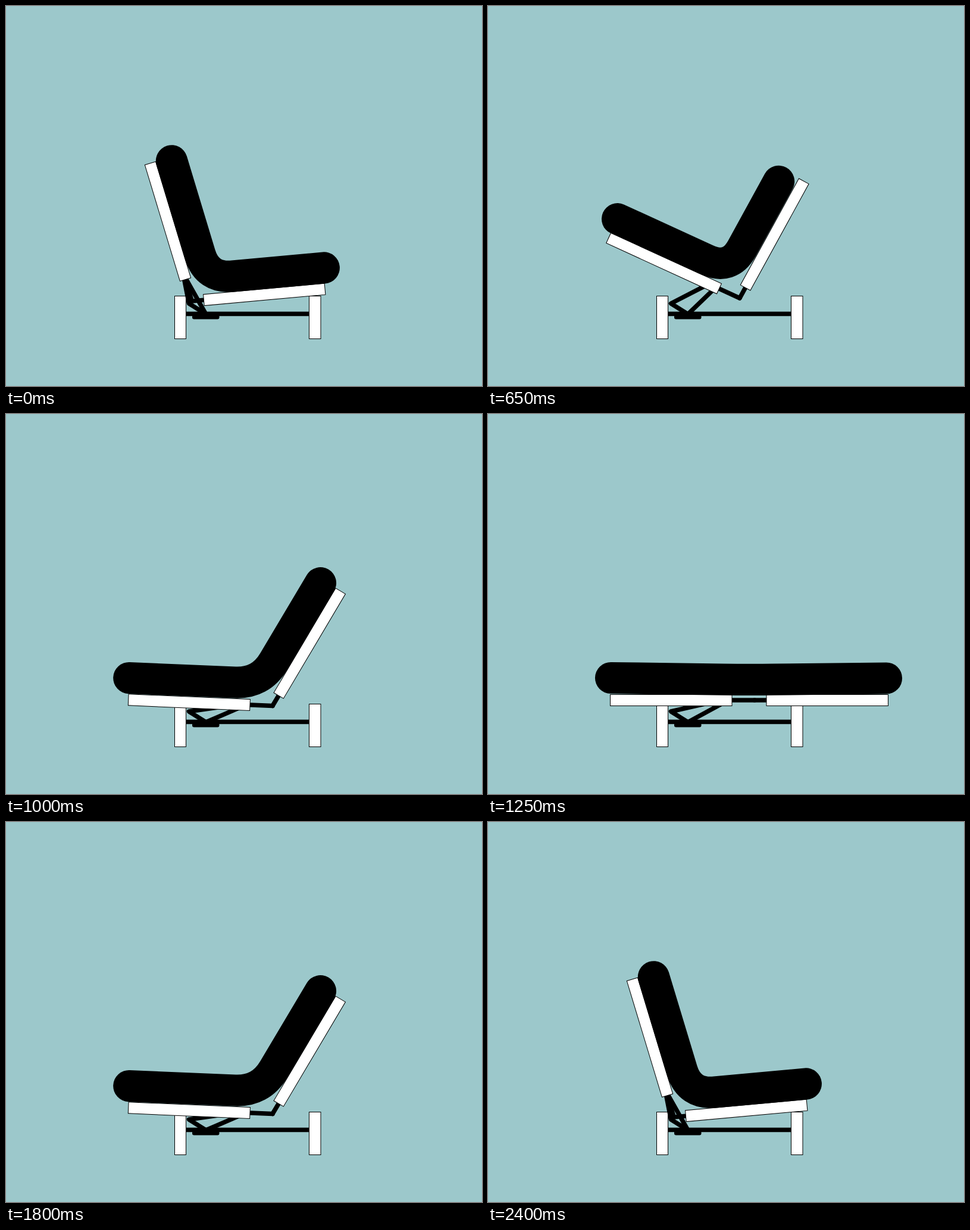
An HTML page for the animation above (2800 ms loop, 800 by 640 pixels).

```html
<!DOCTYPE html>
<html lang="en">
<head>
<meta charset="utf-8">
<title>Folding sofa bed</title>
<style>
  html, body { margin: 0; width: 100%; height: 100%; overflow: hidden; background: #9cc8cb; }
  svg { display: block; width: 800px; height: 640px; }
  .wood { fill: #fff; stroke: #000; stroke-width: 1; }
  .steel { fill: none; stroke: #000; stroke-width: 7.5; stroke-linecap: round; stroke-linejoin: round; }
  .cushion { fill: none; stroke: #000; stroke-width: 53.2; stroke-linecap: round; stroke-linejoin: round; }
</style>
</head>
<body>
<svg viewBox="0 0 800 640">
  <path class="steel" d="M303 518.5H509"/>
  <rect x="313" y="515" width="45.5" height="12.5" rx="3"/>
  <rect class="wood" x="283.5" y="488.5" width="19" height="72"/>
  <rect class="wood" x="509.5" y="488.5" width="19.5" height="72"/>
  <path id="links" class="steel"/>
  <g id="left">
    <path class="steel" d="M0 0H-60"/>
    <rect class="wood" x="-242.5" y="-9.5" width="204.5" height="19"/>
  </g>
  <g id="right">
    <path class="steel" d="M0 0H40"/>
    <rect class="wood" x="20" y="-9.5" width="204.5" height="19"/>
  </g>
  <path id="cushion" class="cushion"/>
</svg>
<script>
const STEP = 50, LOOP = 2800, LAST = 17;
const UNFOLD = 400, FOLD = 1550;

// step, hinge x, y, left tilt, right tilt, cushion ends (along, above each panel), cushion corner from hinge
const poses = [
  [0, 312.5, 497, 73.2, 5.2, 236, 35.7, 226, 35.7, 25.8, -38],
  [5, 423, 492, 24.7, 61.3, 242.4, 35.3, 204, 36.9, -16.6, -46.6],
  [7, 442, 486.5, 12.5, 80.5, 241, 35.5, 224, 51.7, -30.8, -43.5],
  [8, 445, 487, 9, 84, 241, 36, 227, 50, -30, -43],
  [11, 448, 491.3, 2.7, 59.5, 243, 36.7, 219, 36, -20, -37.7],
  [12, 448, 491.5, 2.4, 59.4, 243, 36.8, 219, 36, -20, -37.7],
  [17, 448, 482, 0, 0, 241.5, 37.5, 221.5, 37, -10, -34.3]
];

const byId = id => document.getElementById(id);
const clamp = (v, lo, hi) => Math.max(lo, Math.min(hi, v));

function secant(i, col) {
  const a = poses[i], b = poses[i + 1];
  return (b[col] - a[col]) / (b[0] - a[0]);
}

function slope(i, col) {
  if (i === 0) return secant(0, col);
  if (i === poses.length - 1) return secant(i - 1, col);
  const p = secant(i - 1, col), q = secant(i, col);
  return p * q > 0 ? 2 * p * q / (p + q) : 0;
}

// Monotone cubic through the poses
function poseAt(n) {
  const i = clamp(poses.findIndex(p => p[0] > n) - 1, 0, poses.length - 2);
  const k = n === LAST ? poses.length - 2 : i;
  const a = poses[k], b = poses[k + 1], h = b[0] - a[0], t = (n - a[0]) / h;
  return a.map((v, col) => {
    const s = t * t * (3 - 2 * t);
    return v + (b[col] - v) * s
      + h * t * (1 - t) * ((1 - t) * slope(k, col) - t * slope(k + 1, col));
  });
}

function turned(hinge, degrees, x, y) {
  const r = degrees * Math.PI / 180, c = Math.cos(r), s = Math.sin(r);
  return [hinge[0] + x * c - y * s, hinge[1] + x * s + y * c];
}

function toward(from, to, distance) {
  const dx = to[0] - from[0], dy = to[1] - from[1], k = distance / Math.hypot(dx, dy);
  return [from[0] + dx * k, from[1] + dy * k];
}

function draw(n) {
  const [, x, y, left, right, la, lo, ra, ro, cx, cy] = poseAt(n);
  const hinge = [x, y], corner = [x + cx, y + cy];
  const head = turned(hinge, left, -la, -lo);
  const foot = turned(hinge, -right, ra, -ro);

  byId("left").setAttribute("transform", `translate(${hinge}) rotate(${left})`);
  byId("right").setAttribute("transform", `translate(${hinge}) rotate(${-right})`);
  byId("links").setAttribute("d",
    `M${turned(hinge, left, -57, 0)}L307.5 501L336 519L${turned(hinge, left, -44, 0)}`);
  byId("cushion").setAttribute("d",
    `M${head}L${toward(corner, head, 43)}Q${corner} ${toward(corner, foot, 43)}L${foot}`);
}

const stepsSince = (t, start) => clamp(Math.floor((t - start) / STEP), 0, LAST);
const begin = performance.now();

function tick() {
  const t = (performance.now() - begin) % LOOP;
  draw(stepsSince(t, UNFOLD) - stepsSince(t, FOLD));
  requestAnimationFrame(tick);
}
tick();
</script>
</body>
</html>
```
